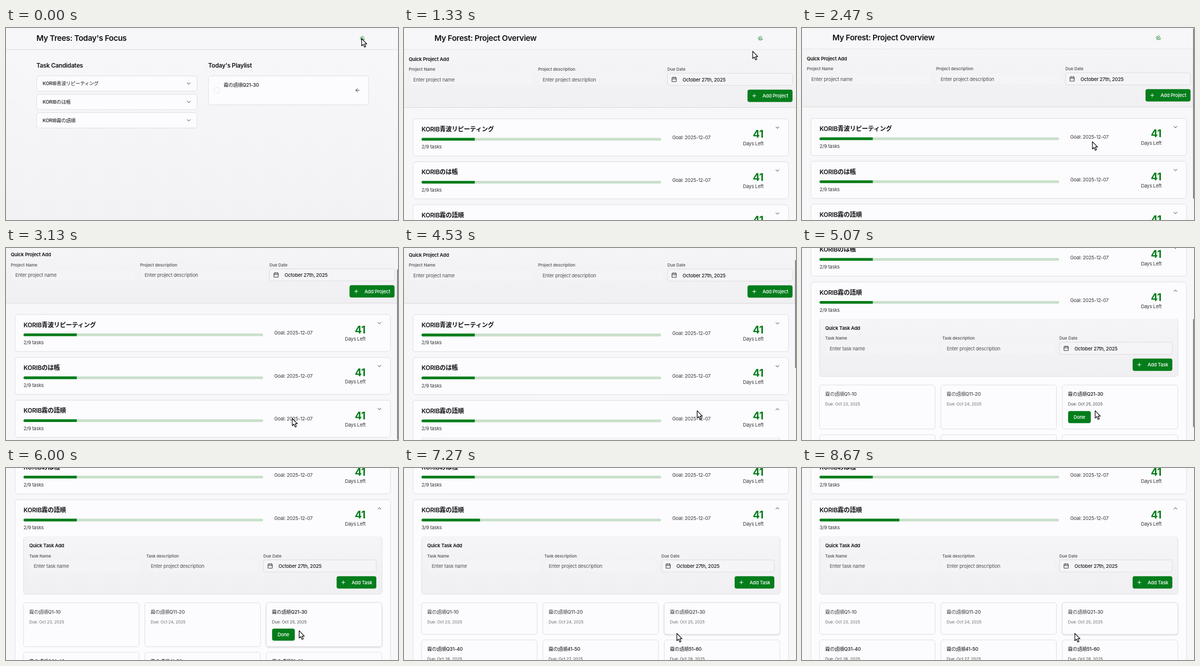
Write an HTML page that moves like this. It is 760 px wide and 373 px high and loops after 8790 ms.

```html
<!DOCTYPE html>
<html lang="ja">
<head>
<meta charset="utf-8">
<style>
html, body { margin: 0; width: 100%; height: 100%; overflow: hidden; background: #f5f4f7; }
#stage { display: block; width: 100vw; height: 100vh; }
text { font: 400 9.33px Inter, "Noto Sans CJK JP", "Noto Sans CJK", sans-serif; letter-spacing: -.02em; fill: #333336; white-space: pre; }
.title { font-size: 15.2px; font-weight: 600; letter-spacing: -.35px; fill: #111113; }
.head { font-size: 11.7px; font-weight: 600; fill: #111113; }
.name { font-size: 12px; font-weight: 600; fill: #111113; }
.bold { font-weight: 600; fill: #111113; }
.mid { font-weight: 500; fill: #18181a; }
.label { font-size: 8px; font-weight: 500; letter-spacing: 0; fill: #4c4c4f; }
.due { font-size: 8px; letter-spacing: -.01em; fill: #4c4c4f; }
.hint { fill: #505053; }
.days { font-size: 20px; font-weight: 700; fill: #047d1b; text-anchor: end; }
.end { text-anchor: end; }
.white { font-weight: 500; fill: #fff; }
.card { fill: #fcfbfd; stroke: #dad9dd; stroke-width: .8; filter: drop-shadow(0 .7px .7px #00000010); }
.field { fill: #f5f4f6; stroke: #d6d5d9; stroke-width: .8; }
.faint { fill: #f4f3f5; stroke: #efeef1; stroke-width: .7; }
.green { fill: #047d1b; }
.line { stroke: #d9d8dc; stroke-width: 1; }
.icon { fill: none; stroke: #333336; stroke-width: 1; stroke-linecap: round; stroke-linejoin: round; }
.past text { opacity: .8; }
</style>
</head>
<body>
<svg id="stage" viewBox="0 0 760 373" preserveAspectRatio="none">
  <defs>
    <linearGradient id="page" x2="0" y2="1"><stop stop-color="#f8f7f9"/><stop offset="1" stop-color="#f2f1f4"/></linearGradient>
    <linearGradient id="panel" x2="0" y2="1"><stop stop-color="#f5f4f6"/><stop offset="1" stop-color="#f0eff1"/></linearGradient>
  </defs>
  <g id="focus"></g>
  <g id="forest"></g>
  <rect id="thumb" x="758.3" width="1.7" rx=".8" fill="#77767a"/>
  <path id="cursor" d="M0 0V14.2L3.2 11.3L5.6 16.8L8 15.7L5.7 10.4H10Z" fill="#fff" stroke="#000" stroke-width="1.2" stroke-linejoin="round"/>
</svg>
<script>
const LOOP = 8790, OPEN_PAGE = 1070, EXPAND = 3930, DONE = 7200;
const CARD_Y = 176.5, CARD_STEP = 83.4, CARD_H = 72, BODY_H = 422, BAR_W = 464.5;
const $ = id => document.getElementById(id);

const text = (x, y, s, c = '') => `<text x="${x}" y="${y}" class="${c}">${s}</text>`;
const box = (x, y, w, h, c, r = 4, more = '') =>
  `<rect x="${x}" y="${y}" width="${w}" height="${h}" rx="${r}" class="${c}" ${more}/>`;
const icon = (x, y, d, more = '') => `<path class="icon" transform="translate(${x} ${y})" d="${d}" ${more}/>`;
const chevron = (x, y) => icon(x, y, 'M-3-1.5L0 1.5L3-1.5');

const trees = `<g class="icon" transform="translate(685.7 14.2) scale(.445)" style="stroke:#047d1b;stroke-width:2">
  <path d="M10 10v.2A3 3 0 0 1 8.9 16H5a3 3 0 0 1-1-5.8V10a3 3 0 0 1 6 0ZM7 16v6M13 19v3M12 19h8.3a1 1 0 0 0 .7-1.7L18 14h.3a1 1 0 0 0 .7-1.7L16 9h.2a1 1 0 0 0 .8-1.7L13 3l-1.4 1.5"/></g>`;
const header = title => box(0, 0, 760, 42, '', 0, 'fill="#f7f6f8"') +
  text(59, 25.3, title, 'title') + trees + '<path class="line" d="M0 42H760"/>';

// Form with two inputs, a date button and a submit button; y is the baseline of its title.
function quickAdd(x, y, w, kind, submitW) {
  const col = (w - 16) / 3, x2 = x + col + 8, x3 = x2 + col + 8, submitX = x + w - submitW;
  return text(x, y, `Quick ${kind} Add`, 'bold') +
    text(x, y + 19.5, kind + ' Name', 'label') +
    text(x2, y + 19.5, kind + ' description', 'label') +
    text(x3, y + 19.5, 'Due Date', 'label') +
    box(x, y + 24.3, col, 23.5, 'faint') + box(x2, y + 24.3, col, 23.5, 'faint') +
    text(x + 8.7, y + 40, `Enter ${kind.toLowerCase()} name`, 'hint') +
    text(x2 + 8.7, y + 40, 'Enter project description', 'hint') +
    box(x3, y + 24.3, col, 23.5, 'field') +
    icon(x3 + 13.3, y + 36, 'M-4-3.4H4V4.4H-4ZM-4-.6H4M-1.9-4.8V-2.4M1.9-4.8V-2.4') +
    text(x3 + 29.3, y + 40, 'October 27th, 2025', 'mid') +
    box(submitX, y + 56, submitW, 24, 'green') +
    icon(submitX + 13, y + 68, 'M-3.2 0H3.2M0-3.2V3.2', 'style="stroke:#fff"') +
    text(submitX + 29, y + 71.4, 'Add ' + kind, 'white');
}

const projects = ['KORIB青波リピーティング', 'KORIBのは帳', 'KORIB霧の語順'];
const ranges = ['Q1-10', 'Q11-20', 'Q21-30', 'Q31-40', '41-50', '51-60'];

function task(i) {
  const x = 34 + i % 3 * 235.3;
  return `<g id="task${i}" class="${i < 2 ? 'past' : ''}">` +
    box(x, 0, 224, 85.5, 'card', 4.5) +
    text(x + 11, 21, '霧の語順' + ranges[i], 'mid') +
    text(x + 11, 40.2, `Due: Oct ${23 + i}, 2025`, 'due') +
    (i < 2 ? '' : `<g class="button">${box(x + 11.3, 50.5, 44, 23.5, 'green')}${text(x + 21.8, 65.6, 'Done', 'white')}</g>`) +
    '</g>';
}

function project(name, i) {
  const open = i == 2;
  return `<g transform="translate(0 ${CARD_Y + i * CARD_STEP})">` +
    box(17.5, 0, 728, CARD_H, 'card', 5.5, `id="card${i}"`) +
    text(34, 24.6, name, 'name') +
    box(34, 37, BAR_W, 5.3, '', 2.6, 'fill="#c9e0cb"') +
    `<path id="bar${i}" class="green"/>` +
    `<text id="count${i}" x="34" y="57.8">2/9 tasks</text>` +
    text(520, 39.2, 'Goal: 2025-12-07') +
    text(696.8, 36.8, '41', 'days') +
    text(697, 51, 'Days Left', 'end') +
    `<g id="arrow${i}" transform="translate(724 17)">${chevron(0, 0)}</g>` +
    (open ? `<svg id="body" y="${CARD_H}" width="760" height="0"><g transform="translate(0 ${-CARD_H})">` +
      box(34, 71.7, 695, 112, '', 5, 'fill="url(#panel)" stroke="#d9d8dc" stroke-width=".8"') +
      quickAdd(45, 92.8, 673, 'Task', 77) +
      `<g transform="translate(0 200.2)">${[0, 1, 2].map(task).join('')}</g>` +
      `<g id="row2">${[3, 4, 5].map(task).join('')}</g></g></svg>` : '') + '</g>';
}

$('focus').innerHTML = box(0, 0, 760, 373, '', 0, 'fill="url(#page)"') +
  header("My Trees: Today's Focus") +
  text(59, 77, 'Task Candidates', 'head') + text(392, 77, "Today's Playlist", 'head') +
  projects.map((name, i) => {
    const y = 93 + i * 35.8;
    return box(59.5, y, 311, 29.8, 'card', 5) + text(71, y + 18.2, name, 'mid') + chevron(354.3, y + 14.8);
  }).join('') +
  box(392.5, 93, 310.5, 56.2, 'card', 5) +
  box(403, 115.8, 10.7, 10.7, '', 2.7, 'fill="#fbfafc" stroke="#e6e5e8" stroke-width=".8"') +
  text(422, 114, '霧の語順Q21-30', 'mid') +
  icon(681.5, 121, 'M3.4 0H-3.4M0-3.4L-3.4 0L0 3.4');

$('forest').innerHTML = box(0, 0, 760, 1000, '', 0, 'fill="#f7f6f8"') +
  header('My Forest: Project Overview') +
  box(0, 42.5, 760, 112, '', 0, 'fill="url(#panel)"') +
  '<path class="line" d="M0 154.5H760"/>' +
  quickAdd(9.3, 63.7, 744, 'Project', 87.3) +
  projects.map(project).join('');

const clamp = k => Math.max(0, Math.min(1, k));
const smooth = k => k * k * (3 - 2 * k);
const ramp = (t, a, b) => smooth(clamp((t - a) / (b - a)));

// Value at time t from [time, value] points.
function track(t, points, ease = k => k) {
  let [t0, v0] = points[0];
  for (const [t1, v1] of points) {
    if (t < t1) return v0 + (v1 - v0) * ease(clamp((t - t0) / (t1 - t0)));
    t0 = t1; v0 = v1;
  }
  return v0;
}

const scrollPath = [[2430, 0], [2470, .8], [2600, 22], [2800, 44], [3000, 47.5], [3130, 47.5], [3300, 46.6],
  [4530, 46.6], [4640, 105], [4800, 205], [4930, 253], [5070, 277.3], [5200, 281], [5400, 281.9]];
const cursorX = [[0, 689.5], [600, 692], [1100, 692], [2150, 563], [2600, 563], [3100, 555], [3200, 555],
  [3730, 568.4], [6050, 568.4], [6900, 529]];
const cursorY = [[0, 20.5], [600, 20.3], [1100, 20.3], [2150, 220.8], [2600, 220.8], [3100, 331], [3200, 331],
  [3730, 316.2], [6050, 316.2], [6900, 321.3]];

function setBar(i, part) {
  const end = 34 + BAR_W * part;
  $('bar' + i).setAttribute('d', `M36.6 37H${end}v5.3H36.6a2.65 2.65 0 0 1 0-5.3Z`);
}

function draw(t) {
  const forest = t >= OPEN_PAGE, scroll = track(t, scrollPath);
  const done = t >= DONE, expanded = t >= EXPAND;
  const open = BODY_H * ramp(t, EXPAND, EXPAND + 250);

  $('focus').style.display = forest ? 'none' : '';
  $('forest').style.display = forest ? '' : 'none';
  $('forest').setAttribute('transform', `translate(0 ${-scroll})`);

  $('card2').setAttribute('height', CARD_H + open);
  $('body').setAttribute('height', open);
  $('arrow2').setAttribute('transform', `translate(724 17) rotate(${180 * ramp(t, EXPAND, EXPAND + 200)})`);

  setBar(0, 2 / 9);
  setBar(1, 2 / 9);
  setBar(2, (2 + ramp(t, DONE, DONE + 250)) / 9);
  $('count2').textContent = (done ? 3 : 2) + '/9 tasks';

  for (let i = 0; i < 3; i++) $('task' + i).firstChild.setAttribute('height', done ? 61.5 : 85.5);
  $('task2').setAttribute('class', done ? 'past' : '');
  $('task2').querySelector('.button').style.display = done ? 'none' : '';
  const hover = ramp(t, 5070, 5300);
  $('task2').firstChild.style.filter =
    `drop-shadow(0 ${.7 + .7 * hover}px ${.7 + 1.1 * hover}px rgba(0,0,0,${.07 + .1 * hover}))`;
  $('row2').setAttribute('transform', `translate(0 ${done ? 272.6 : 296.6})`);

  const shown = t < EXPAND ? ramp(t, 2400, 2460) - ramp(t, 3500, 3730) : ramp(t, 4480, 4525) - ramp(t, 5700, 5950);
  $('thumb').setAttribute('y', scroll * (expanded ? .498 : .87));
  $('thumb').setAttribute('height', expanded ? 210 : 331);
  $('thumb').setAttribute('opacity', shown);

  $('cursor').setAttribute('transform', `translate(${track(t, cursorX, smooth)} ${track(t, cursorY, smooth)})`);
}

function tick() {
  draw(performance.now() % LOOP);
  requestAnimationFrame(tick);
}
tick();
</script>
</body>
</html>
```
